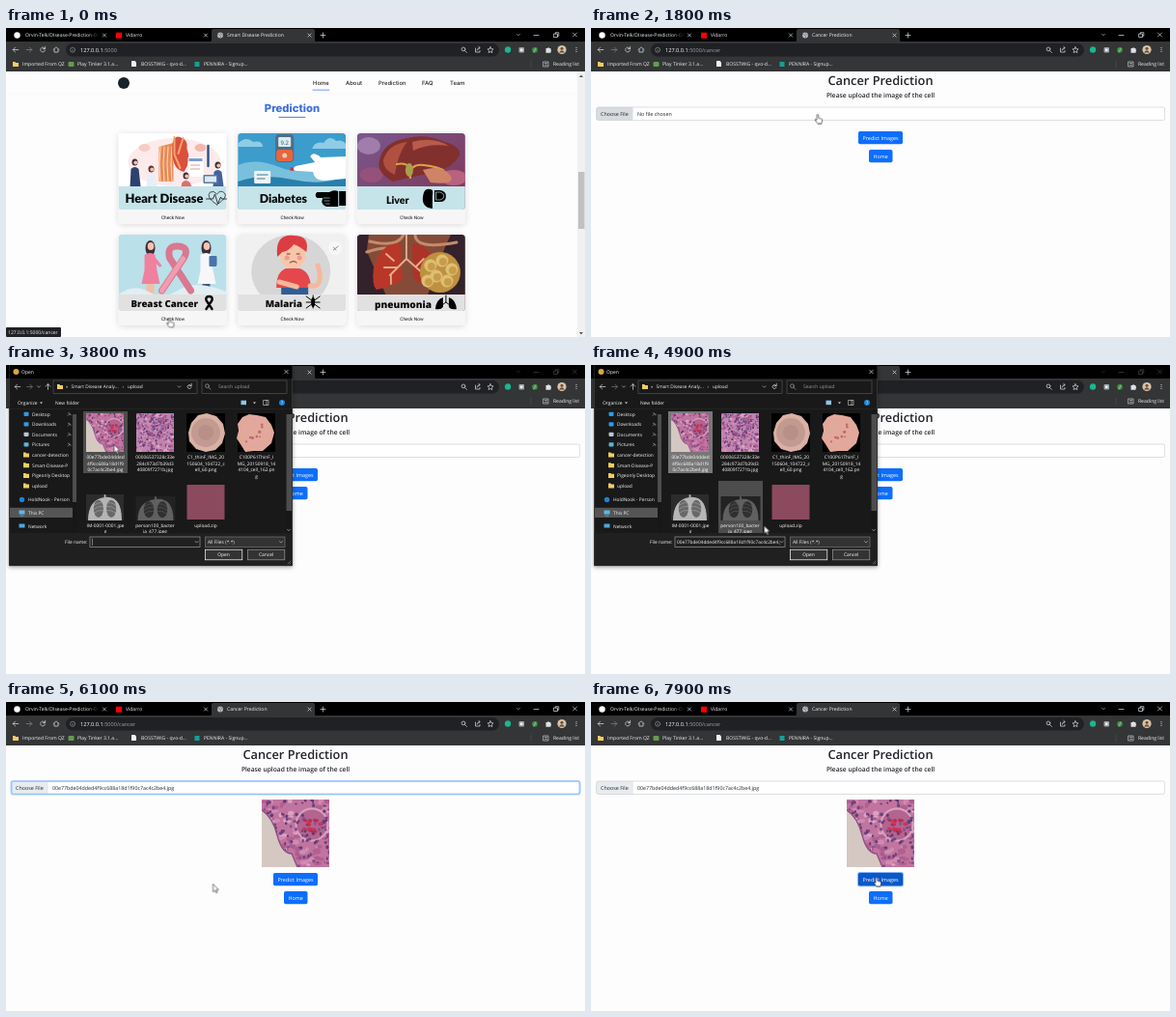
Animation of 600 by 320 pixels, one loop 8 s. Source, as an HTML page:

```html
<!DOCTYPE html>
<html lang="en">
<head>
<meta charset="utf-8">
<title>Cancer Prediction</title>
<style>
html,body{margin:0;width:100%;height:100%;overflow:hidden;background:#fefdfe}
svg{display:block}
#stage{width:600px;height:320px;font-family:"Open Sans",sans-serif;text-rendering:geometricPrecision}
.line{fill:none;stroke-linecap:round;stroke-linejoin:round}
.mid{text-anchor:middle}
.end{text-anchor:end}
.inter{font-family:Inter,sans-serif;font-weight:500}
.roboto{font-family:Roboto,sans-serif}
.lato{font-family:Lato,sans-serif;font-weight:900}
.heavy{font-weight:800}
.semi{font-weight:600}
#dialog{transform-origin:150px 104px;animation:dialog 8s linear infinite}
#pointer{animation:pointer 8s infinite}
@keyframes dialog{
  0%,29.4%{opacity:0;transform:scale(.95)}
  32%,71.25%{opacity:1;transform:none}
  72.5%{opacity:.7;transform:scale(.986)}
  75%,to{opacity:0;transform:scale(.96)}
}
</style>
</head>
<body>
<svg id="stage" viewBox="0 0 600 320"></svg>
<script>
const LOOP = 8000;
let css = '', spans = 0;

const text = (x, y, s, size = 5.05, fill = '#f4f5f6', cls = '') =>
  `<text x="${x}" y="${y}" font-size="${size}" fill="${fill}" class="${cls}">${s}</text>`;
const rect = (x, y, w, h, fill, rx = 0, more = '') =>
  `<rect x="${x}" y="${y}" width="${w}" height="${h}" fill="${fill}" rx="${rx}" ${more}/>`;
const oval = (x, y, rx, fill, ry = rx) =>
  `<ellipse cx="${x}" cy="${y}" rx="${rx}" ry="${ry}" fill="${fill}"/>`;
const shape = (d, fill, more = '') => `<path d="${d}" fill="${fill}" ${more}/>`;
const line = (d, stroke = '#dfe1e5', w = .7) =>
  `<path class="line" d="${d}" stroke="${stroke}" stroke-width="${w}"/>`;
const at = (x, y, body) => `<g transform="translate(${x} ${y})">${body}</g>`;
const cross = (x, y, r = 1.6, c = '#dfe1e5') =>
  line(`M${x - r} ${y - r}l${2 * r} ${2 * r}m0 ${-2 * r}l${-2 * r} ${2 * r}`, c);
const chevron = (x, y, c = '#c8c8c8') => line(`M${x - 1.5} ${y - .8}l1.5 1.6 1.5-1.6`, c, .6);
const leftArrow = (x, y, c) => line(`M${x + 2.8} ${y}h-5.6m2.4-2.4l-2.4 2.4 2.4 2.4`, c);
const rightArrow = (x, y, c) => line(`M${x - 2.8} ${y}h5.6m-2.4-2.4l2.4 2.4-2.4 2.4`, c);
const reload = (x, y, r = 2.4) =>
  line(`M${x + r} ${y - .8}a${r} ${r} 0 1 0 0 1.6m.2-4v2.4h-2.2`);
const lens = (x, y, c) => line(`M${x + 1} ${y + 1}l1.9 1.9M${x + 1.4} ${y - .6}a1.9 1.9 0 1 0-3.8 0a1.9 1.9 0 1 0 3.8 0`, c);
const folder = (x, y) => shape(`M${x - 3} ${y - 2.4}h2.3l.8.8h2.9v4.2h-6z`, '#f3cd62');

// Shows a group only between two times of the loop.
function during(from, to, body) {
  const name = 'span' + ++spans, pct = t => t / LOOP * 100 + '%';
  css += `@keyframes ${name}{0%{opacity:${from ? 0 : 1}}${pct(from)}{opacity:1}${to < LOOP ? pct(to) + ',to{opacity:0}' : 'to{opacity:1}'}}`;
  return `<g style="animation:${name} 8s step-end infinite">${body}</g>`;
}

function random(seed) {
  return () => (seed = (seed * 16807) % 2147483647) / 2147483647;
}

// Stained tissue, 70 by 70.
function tissue(id, seed, biopsy) {
  const rnd = random(seed), pick = list => list[Math.floor(rnd() * list.length)];
  let s = rect(0, 0, 70, 70, biopsy ? '#c0749f' : '#bd85b0');
  for (let i = 0; i < 130; i++)
    s += oval(rnd() * 70, rnd() * 70, 1.5 + rnd() * 3.5, pick(['#cf8bb0', '#b3608f', '#d9a3c2', '#ac5c90']), 1 + rnd() * 2);
  if (biopsy) s += oval(52, 26, 17.5, '#d9a3c0') + oval(52, 26, 15.5, '#b3648f');
  for (let i = 0; i < (biopsy ? 125 : 170); i++)
    s += oval(rnd() * 70, rnd() * 70, 1 + rnd() * 1.1, pick(['#70457f', '#84508e', '#643a72']), 1 + rnd() * 1.2);
  if (biopsy) {
    for (let i = 0; i < 15; i++) s += oval(44 + rnd() * 17, 19 + rnd() * 15, 2.2, pick(['#cf3456', '#b92d55']), 1.6);
    s += shape('M0 11Q11 18 16 37T31 56L37 70H0Z', '#d5c8c2') + line('M0 11Q11 18 16 37T31 56L37 70', '#8b4d85', 1.3);
  }
  return `<symbol id="${id}" viewBox="0 0 70 70" preserveAspectRatio="none">${s}</symbol>`;
}
const picture = (id, x, y, w, h) => `<use href="#${id}" x="${x}" y="${y}" width="${w}" height="${h}"/>`;

function browser() {
  const grey = '#9aa0a6', bar = '#343536';
  return rect(0, 0, 600, 15, '#000') + rect(0, 14, 600, 31, bar) +
    shape('M211 14.5q2 0 2-2V3q0-2 2-2h103q2 0 2 2v9.5q0 2 2 2z', bar) +
    oval(11.5, 7.5, 3.2, '#fff') + text(20, 9.3, 'Orvin-Telk/DIsease-Prediction-On', 5.05, 'url(#fade)') + cross(102, 7.5) +
    rect(114, 4.7, 6, 6, '#f00') + text(124, 9.3, 'Vidarro') + cross(207, 7.5) +
    oval(222, 7.5, 3, '#b6babf') + line('M219.5 6.5l2.5 1 .5 2M222 5l2.3 2.5', '#5f6368', .6) +
    during(0, 300, text(229, 9.3, 'Smart Disease Prediction')) + during(300, LOOP, text(229, 9.3, 'Cancer Prediction')) +
    cross(314.5, 7.5) + line('M326 7.5h5m-2.5-2.5v5') +
    chevron(531, 7) + line('M547 7.5h5M568 6h3.5v3.5h-3.5zM569.3 6V4.7h3.5v3.5h-1.3') + cross(589.5, 7, 2) +
    during(2450, 5900, rect(524, 1, 76, 12, '#000', 0, 'opacity=".7"')) +
    leftArrow(10, 22.5) + rightArrow(24, 22.5, '#85888d') + reload(38, 22.5) + line('M49 22.5l3-2.7 3 2.7M50 22v3h4v-3') +
    rect(62, 16, 449, 13.4, '#202124', 6.7) + line('M71.6 22.7a2.5 2.5 0 1 0-5 0a2.5 2.5 0 1 0 5 0M69.1 22.5v1.4', grey, .6) +
    `<text x="77" y="24.7" font-size="5.6" fill="#fff">127.0.0.1<tspan fill="${grey}">:5000</tspan></text>` +
    during(300, LOOP, `<text x="77" y="24.7" font-size="5.6" fill="none">127.0.0.1:5000<tspan fill="${grey}">/cancer</tspan></text>`) +
    lens(474.5, 22.5) + line('M486.5 21v4h4.5v-1.5M488 23q.5-2.5 3-2.5m-1.2-1.2l1.3 1.2-1.3 1.3') +
    line('M502 19.7l.9 1.9 2.1.3-1.5 1.5.4 2.1-1.9-1-1.9 1 .4-2.1-1.5-1.5 2.1-.3z') +
    oval(520, 22.5, 3.2, '#18b890') + rect(531.5, 20, 5.5, 5.5, '#9fa7ac', 1) + oval(534.2, 22.7, 1.3, '#fff') +
    oval(548, 22.7, 2.8, '#3f9448') + line('M547 25l2-4', '#b7d8a4') +
    shape('M559.5 21h1.5a1.2 1.2 0 0 1 2.2 0h1.3v1.5a1.2 1.2 0 0 1 0 2v1.2h-5z', '#dfe1e5') +
    oval(576, 22.5, 4.6, '#d8c5a5') + oval(576, 21.3, 1.5, '#6a4b3c') + shape('M573 25.5q3-4.5 6 0z', '#6a4b3c') +
    [20.5, 22.5, 24.5].map(y => oval(591, y, .6, '#dfe1e5')).join('') +
    folder(10, 37.5) + text(17, 39.3, 'Imported From QZ') +
    rect(64.5, 35, 6, 5, '#659a55', 1) + text(74, 39.3, 'Play Tinker 3.1.a...') +
    shape('M130 34h3.5l1.5 1.5v4.5h-5z', '#f1f3f4') + text(140, 39.3, 'BOSSTWIG - qvo-d...') +
    rect(195.5, 35, 5, 5, '#14a098') + text(205, 39.3, 'PENNIRA - Signup...') +
    line('M544 34v7', '#5f6368', .4) + line('M557 35h5v5h-5zM558.5 36.5h2M558.5 38.3h2', '#dfe1e5', .6) + text(567, 39.3, 'Reading list');
}

const pinkPerson = (x, dress, legs) => at(x, 0,
  oval(0, 14, 5, '#3e2b3c', 8) + oval(.5, 12, 3.3, '#f6c4ae', 4) + rect(-4, 44, 8, 18, legs) + shape('M-6 21q6-4 11 0l2 16 3 14h-19l3-14z', dress) +
  shape('M4 22l8 10-2 2-8-8z', dress));
const medic = (x, y, coat, hair) => oval(x, y, 3, hair, 3.6) + oval(x + .8, y + .6, 2, '#f3bea3') + shape(`M${x - 5} 55l1-${48 - y}q4-4 8 0l2 ${48 - y}z`, coat);
const strands = (x, top, bottom, color) => [0, 4, 8, 12].map(d => line(`M${x + d} ${top}q-2 ${(bottom - top) / 2} 0 ${bottom - top}`, color, 1)).join('');

const art = [
  rect(0, 0, 112, 79, '#fff', 3) + oval(58, 30, 48, '#fcebea', 25) +
    shape('M42 14l15-4v40H42z', '#e98a55') + strands(43.5, 14, 50, '#fbe0cd') +
    shape('M56 11q2-11 10-6 6 2 5 11 5 12-3 24-14-2-12-29z', '#d9503c') + line('M58 4v18l6 14M67 5l-5 16', '#f3a46c', 2) +
    rect(72, 25, 16, 20, '#fff', 1) + rect(73, 26, 14, 3, '#7c9bd1') + line('M75 33h9M75 37h9', '#e59a92', 1) +
    line('M93 13v21', '#2c4f8f', 2.4) + medic(17, 30, '#2c426f', '#3c2a39') + medic(34, 37, '#e9eef6', '#55333a') + medic(70, 44, '#df6f67', '#3c2a39') + medic(103, 33, '#41659c', '#3c2a39') +
    rect(88, 43, 15, 9, '#5d779f', 1) + rect(89.5, 44.5, 12, 6, '#dbeaf5') + oval(85, 15, 6, '#f4b8b1', 4) + oval(27, 15, 6, '#f8ccc6', 4),
  rect(0, 0, 112, 79, '#3c9ccc', 3) + shape('M0 11q8-9 16-2 9-2 10 5H0zM77 16q3-8 12-6 6-9 13-2 6-2 10 3v5z', '#8fcce6') + shape('M0 33q20-8 43 2t69-2v24H0z', '#79c0dd') + shape('M0 50q25-9 57-2t55-4v13H0z', '#287fad') +
    rect(39, 1, 19, 29, '#536b82', 4) + rect(40, 17, 17, 12, '#e7663d', 3) + rect(42, 4, 13, 10, '#d7edf0', 1) + text(48.5, 11.5, '9.2', 6, '#35516a', 'mid') + oval(48.5, 23, 2.5, '#f7c9ad') +
    shape('M112 24L86 25q-8-7-11-1l5 6-20 4q-5 3 0 5l18 1q1 9 12 9l22-2z', '#fff') + rect(17, 39, 17, 13, '#eef4f5', 1) + line('M20 43h11M20 47h8', '#3775a1', 1) + oval(56, 37, 2, '#d53337'),
  rect(0, 0, 112, 79, 'url(#plum)', 3) + oval(12, 13, 12, '#a07daa', 9) + oval(100, 46, 14, '#b7627e', 8) + oval(15, 43, 12, '#94517a', 8) +
    shape('M23 29q3-20 29-24 19-5 39 4 17 5 15 14-7 13-25 17T37 50q-17-9-14-21z', '#81302d') + shape('M27 28q5-17 25-19-9 10-13 34-12-5-12-15z', '#b0503f') +
    shape('M57 9q21-6 38 4-21-3-37 5z', '#b85a4c') + line('M55 46q-1-15 14-13t20 5M56 36q-6-6-15-4', '#e0a148', 2.2) + oval(54, 38, 4, '#a9a04a', 7) + shape('M68 38q20-6 28 5t-20 8z', '#cf8468'),
  rect(0, 0, 112, 79, '#bae0ea', 3) + pinkPerson(33, '#ef819f', '#f3bea3') + pinkPerson(91, '#f7f6f8', '#3f5582') + rect(94, 22, 8, 11, '#4974a9', 1) +
    shape('M0 62q16-12 31-3t32-2 49 2v3z', '#e2eef2') + line('M45 58L68 24Q74 13 62 12t-9 12L75 58', '#d97891', 7) + line('M45 58L67 25', '#ee9eb0', 5),
  rect(0, 0, 112, 79, '#f0f0f0', 3) + oval(55, 38, 41, '#d6d6d6', 38) + rect(45, 51, 28, 11, '#355c91') + shape('M40 55q0-17 10-20h14q11 3 12 20z', '#e5484c') + oval(57, 22, 13, '#f9c5a8', 13) +
    shape('M41 23q-3-24 17-22 17 0 13 17-7-6-13-8-5 7-12 8z', '#dd3d42') + oval(51, 24, 2.5, '#ef9991') + oval(64, 24, 2.5, '#ef9991') + line('M51 20h3M61 20h3M54 29q4-3 7 0', '#593731', 1) + line('M75 53q11 2 10-12l-2-9M43 49l18 5', '#f5b89a', 5) +
    oval(101, 14, 7, '#f7f7f7') + line('M99 16l5-4M99 13l3 3', '#666', .7),
  rect(0, 0, 112, 79, '#33212c', 3) + shape('M12 0h85l-6 13-18 50H30L10 17z', '#854b39') + line('M13 7Q42 14 48 0M103 8Q60 16 60 0M10 18q12-4 20-4', '#c48b6b', 3) +
    shape('M45 10Q26 6 17 35q-2 17 3 22 20-4 27-11z', '#b93728') + shape('M57 10q18-2 25 25 2 14-2 20-18-4-22-11z', '#ad3328') +
    line('M51 0v25L34 42M51 25l17 15M42 34l-14 0M38 27l-8-7M61 33l8-8M35 41v10', '#e6af8d', 1.8) + oval(86, 39, 21, '#be9140') +
    [[76, 32], [88, 27], [98, 36], [82, 43], [93, 48], [73, 48]].map(([x, y]) => oval(x, y, 6.5, '#dfbf72') + oval(x + 1, y + 1, 4, '#c89d4a')).join('')
];
const glyphs = [
  line('M91 68h7l2-5 3 10 3-7 1 2h5', '#111', .8) + line('M102 74q-12-8-7-13 4-2 7 2 4-5 8-1 4 4-8 12', '#111', .7),
  shape('M82 61h13q4-3 9-1v16H92q-4-1-5-5l1-4h-6q-3-3 0-6z', '#000') + rect(105, 60, 7, 15, '#000') + line('M89 67h6M90 70h5M91 73h4', '#c5e4e9', .6),
  shape('M68 66q1-10 8-8 4 1 2 7v13q-11-1-10-12zM80 59h6q6 1 6 6 0 6-6 6h-6z', '#000') + line('M79 59v18', '#c5e4e9', .9) + line('M82 61h4q4 1 4 4t-4 4h-4z', '#c5e4e9', .7),
  line('M91 77l6-9q1-4-3-4t-3 4l6 9', '#000', 2.4),
  oval(78, 70, 2, '#000', 5) + line('M71 64l7 5 7-5M71 70h14M71 76l7-5 7 5M78 63v13', '#000', 1),
  shape('M89 65q-7 2-8 12 6 1 8-2zM95 65q7 2 8 12-6 1-8-2z', '#000') + line('M92 63v7l-4 3M92 70l4 3', '#000', 1)
];
const labels = [['Heart Disease', 7, 72, 12.8, 'lato'], ['Diabetes', 22.5, 72, 12.3, 'lato'], ['Liver', 30, 73, 10.6, 'lato'],
  ['Breast Cancer', 13, 75, 9.7, 'heavy'], ['Malaria', 28.5, 74.7, 9.7, 'heavy'], ['pneumonia', 18, 75.5, 10.1, 'heavy']];

function card(i) {
  const [name, x, y, size, cls] = labels[i], low = i > 2;
  return at(116.5 + i % 3 * 123.7, low ? 214 : 109,
    rect(0, 0, 112, 94, '#f6f6f6', 4, 'filter="url(#halo)"') + `<g clip-path="url(#face)">${art[i]}` +
    rect(0, low ? 62 : 55, 112, low ? 17 : 24, low ? '#e1e1e1' : '#c5e4e9') + '</g>' +
    text(x, y, name, size, '#080808', cls) + glyphs[i] + text(56.5, 88.7, 'Check Now', 4.8, '#111', 'mid roboto'));
}

function homePage() {
  const nav = [['Home', 318], ['About', 352], ['Prediction', 386], ['FAQ', 431], ['Team', 460]];
  return rect(0, 45, 600, 275, '#fefdfe') + line('M0 68h592', '#f3f3f5', .6) + oval(122, 57, 6, '#17222b') +
    nav.map(([s, x]) => text(x, 58.5, s, 5.9, '#222', 'inter')).join('') + line('M318 64.2h17', '#4a80e8', .8) +
    text(296.5, 87, 'Prediction', 11.3, '#3d6fd9', 'mid inter heavy') + line('M283 92.4h27', '#3d6fd9', .9) +
    [0, 1, 2, 3, 4, 5].map(card).join('') +
    rect(592, 45, 8, 275, '#f1f1f1') + rect(593, 149, 6.5, 59, '#c1c1c1') +
    shape('M594 51l2-2.5 2 2.5zM594 315l2 2.5 2-2.5z', '#555') +
    rect(0, 310, 57, 10, '#202124', 1) + text(2, 317, '127.0.0.1:5000/cancer', 5.05, '#f1f3f4');
}

const button = (x, y, w, label, fill = '#0d6efd') =>
  rect(x, y, w, 13.2, fill, 1.8) + text(x + w / 2, y + 8.6, label, 5.4, '#fff', 'mid');
const predict = (y, fill) => button(277, y, 46, 'Predict Images', fill);
const buttons = y => predict(y) + button(288, y + 19, 24.5, 'Home');

function cancerPage() {
  const border = (c, w) => rect(5.6, 82, 589, 13.5, 'none', 2, `stroke="${c}" stroke-width="${w}"`);
  const choose = text(10, 90.8, 'Choose File', 5.4, '#212529');
  return text(300, 59, 'Cancer Prediction', 12.8, '#212529', 'mid semi') +
    text(300, 72, 'Please upload the image of the cell', 6.7, '#212529', 'mid semi') +
    rect(5.6, 82, 589, 13.5, '#fff', 2) + rect(5.6, 82, 37.5, 13.5, '#e9ecef', 2) +
    during(1650, 2450, rect(5.6, 82, 37.5, 13.5, '#d8dcdf', 2)) + choose + line('M43.2 82v13.5', '#ced4da', .5) + border('#c3cad1', .6) +
    during(300, 6100, text(48, 90.8, 'No file chosen', 5.4, '#212529') + buttons(107)) +
    during(6100, LOOP, text(48, 90.8, '00e77bde04dded4f9cc688a18d1f90c7ac4c2be4.jpg', 5.3, '#212529') + picture('biopsy', 265, 101, 70, 70) + buttons(177)) +
    during(6100, 7800, border('#b6d4fe', 2.2) + border('#86b7fe', .6)) +
    during(7400, 7800, predict(177, '#0b5ed7')) +
    during(7800, LOOP, rect(276, 176, 48, 15.2, '#86b4f8', 2.5) + predict(177, '#0a58ca'));
}

function fileLabel(x, y, lines) {
  return lines.map((s, i) => text(x, y + i * 6.5, s, 4.8, '#fff', 'mid')).join('');
}

function chest(x, y, w, h, back, bone, lung) {
  return at(x, y, rect(0, 0, w, h, back) + shape(`M2 ${h}Q2 5 ${w / 2} 3T${w - 2} ${h}z`, bone) +
    oval(w * .33, h * .55, w * .13, lung, h * .34) + oval(w * .67, h * .55, w * .13, lung, h * .34) +
    line(`M${w / 2} 1v${h - 2}`, bone, 1.8) +
    [.35, .5, .65].map(k => line(`M${w * .2} ${h * k + 2}q${w * .13}-4 ${w * .25}-3m${w * .1} 0q${w * .12}-1 ${w * .25} 3`, bone, .5)).join(''));
}

function dialog() {
  const box = (x, y, w, h, fill, stroke) => rect(x, y, w, h, fill, 0, `stroke="${stroke}" stroke-width=".7"`);
  const tree = [['Desktop', 51, '#2e9be8'], ['Downloads', 61.5, '#2e9be8'], ['Documents', 72, '#b9c7d3'], ['Pictures', 82.5, '#58b6dc'],
    ['cancer-detection', 93], ['Smart-Disease-P', 103.7], ['Pigeonly Desktop', 114.3], ['upload', 125]];
  const pin = y => line(`M64 ${y + 1.5}l1.2-1.2m-.6-1.4l2 2m-1.4-2.4l2 2`, '#aaa', .6);
  const hover = (x, y, h, c = '#4d4d4d') => rect(x, y, 46, h, c);
  const path = (folderName, x) => text(67.5, 24.2, folderName, 4.8) + text(x, 24, '›', 4.8) + text(x + 5.5, 24.2, 'upload', 4.8);
  const spots = random(7);
  let dots = '';
  for (let i = 0; i < 8; i++) dots += oval(249 + spots() * 20, 59 + spots() * 22, .9 + spots() * .8, '#c0686c');
  const openButton = fill => box(206.4, 191.2, 38.4, 10.6, fill, '#fff') + text(225.6, 198.3, 'Open', 4.9, '#fff', 'mid');
  return rect(3, 0, 294, 208, '#191919', 0, 'filter="url(#soft)"') + box(3.3, .3, 293.4, 207.5, '#191919', '#444') +
    rect(3.5, 0, 293, 14, '#000') + oval(10.5, 7, 3, '#d9a53c') + text(16, 9, 'Open') + cross(290.5, 7, 1.8) +
    leftArrow(12, 22.5, '#ddd') + rightArrow(24.5, 22.5, '#777') + chevron(34, 22.5) + line('M43.5 25.3v-5.6m-2.3 2.4l2.3-2.4 2.3 2.4') +
    box(49, 16, 149, 13.5, '#191919', '#535353') + folder(56, 22.5) + text(62, 24.2, '«', 4.8) +
    during(0, 3300, path('Smart Disease Analysis', 121.5)) + during(3300, LOOP, path('Smart Disease Analy...', 120.5)) +
    chevron(179.5, 22.5) + reload(190, 22.5, 2) + box(203, 16, 88, 13.5, '#191919', '#535353') + lens(209, 22.3, '#aaa') + text(220, 24.2, 'Search upload', 4.9, '#9a9a9a') +
    text(12, 40.7, 'Organize', 4.9) + shape('M35 38.5h3l-1.5 1.7z', '#ddd') + text(51, 40.7, 'New folder', 4.9) +
    rect(243.5, 36.7, 5.5, 4.5, '#8dc5e8') + shape('M256 38.5h3l-1.5 1.7z', '#ddd') + line('M267 36.5h5v5h-5zM270 36.5v5', '#ddd', .6) +
    oval(286, 39, 3, '#1684d8') + text(286, 40.8, '?', 5, '#fff', 'mid') + line('M4 45.5h292', '#2c2c2c', .5) +
    tree.map(([s, y, c]) => (c ? rect(18.5, y - 2.3, 5, 4.2, c, .8) + pin(y) : folder(21, y)) + text(27, y + 1.8, s, 4.85)).join('') +
    oval(16.5, 139.5, 2.7, '#1685d8') + text(23, 141.3, 'HoldNook - Person', 4.85) +
    rect(4, 147.8, 66, 10.2, '#555') + rect(13.5, 150.5, 6, 4, '#5bb9e9') + line('M15 156h3', '#5bb9e9') + text(23, 154.8, 'This PC', 4.85) +
    rect(13.5, 164.5, 6, 4, '#4ca7de') + text(23, 168.8, 'Network', 4.85) +
    rect(69, 46, 4, 128, '#171717') + rect(69, 51, 4, 91, '#4d4d4d') + rect(290, 46, 6, 128, '#171717') + rect(290.5, 51, 5.5, 100, '#4d4d4d') + chevron(293, 171) +
    during(2550, 3400, hover(184, 48, 69)) + during(3400, 3750, hover(131.5, 48, 64)) + during(3750, 4200, hover(80, 48, 64)) +
    during(4200, LOOP, hover(80, 48, 64, '#777')) + during(4650, 5150, hover(132, 120, 54)) +
    picture('biopsy', 83, 50, 39, 40) + picture('dense', 135, 50, 39, 40) +
    rect(187, 50, 40, 40, '#000') + rect(240, 50, 39, 40, '#000') +
    shape('M199 52l9-2 10 3 7 8 2 10-3 10-7 7-10 2-10-3-7-8-1-9 3-10z', '#d9b1a5') + oval(207, 70, 15, '#c39a90') + oval(207, 70, 8, '#b98f88') +
    shape('M245 54l7-3 8 1 9 2 6 8 3 8-3 11-9 8-9 0-9 1-5-8-4-6 2-8-1-7z', '#e3a89c') + dots +
    fileLabel(103, 97, ['00e77bde04dded', '4f9cc688a18d1f9', '0c7ac4c2be4.jpg']) + fileLabel(154.5, 97, ['00006537328c33e', '284c973d7b39d3', '40809f7271b.jpg']) +
    fileLabel(207, 97, ['C1_thinF_IMG_20', '150604_104722_c', 'ell_60.png']) + fileLabel(259.5, 97, ['C100P61ThinF_I', 'MG_20150918_14', '4104_cell_162.pn', 'g']) +
    chest(83, 134, 39, 27, '#2c2c2c', '#b5b5b5', '#686868') + chest(134.5, 136, 41, 25, '#222', '#606060', '#303030') + rect(187.5, 124, 39, 36, '#8c4a5e') +
    fileLabel(103, 167.7, ['IM-0001-0001.jpe', 'g']) + fileLabel(154.5, 167.7, ['person100_bacter', 'ia_477.jpeg']) + fileLabel(207, 167.7, ['upload.zip']) +
    rect(3.7, 174, 292.6, 33.4, '#202020') + text(61, 184.7, 'File name:', 4.9) + box(87, 178, 114, 10.4, '#202020', '#999') +
    during(2600, 3130, line('M89.3 180v6.5', '#fff', .5)) + during(3660, 4190, line('M89.3 180v6.5', '#fff', .5)) +
    during(4200, 5550, `<svg x="88" y="178" width="107.5" height="10">${text(1, 6.7, '00e77bde04dded4f9cc688a18d1f90c7ac4c2be4.jpg', 4.75)}</svg>`) +
    during(5550, LOOP, rect(88, 179.5, 106, 7.4, '#0878d2') + `<svg x="88" y="178" width="107" height="10">${text(105, 6.7, '00e77bde04dded4f9cc688a18d1f90c7ac4c2be4.jpg', 4.75, '#fff', 'end')}</svg>`) +
    chevron(197.5, 183.3) + box(206.4, 178, 82.6, 10.4, '#333', '#777') + text(209, 184.7, 'All Files (*.*)', 4.9) + chevron(285, 183.3) +
    openButton('#333') + during(5300, LOOP, openButton('#777')) + box(250.4, 191.2, 38.4, 10.6, '#333', '#999') + text(269.6, 198.3, 'Cancel', 4.9, '#fff', 'mid') +
    line('M292 206l3-3M294 206l1-1', '#888', .6);
}

function pointer() {
  const stops = [[0, 169.5, 300.5], [900, 169.5, 300.5], [1300, 226, 124], [1500, 226, 124], [1800, 235, 89.5], [2400, 235, 89.5], [2900, 222, 92], [3300, 222, 92],
    [4000, 106, 82], [4300, 106, 82], [4900, 179.5, 166.5], [5100, 179.5, 166.5], [5500, 214.5, 188.5], [6100, 214.5, 188.5], [6700, 252, 151], [7100, 252, 151], [7550, 296, 181.5], [LOOP, 296, 181.5]];
  css += `@keyframes pointer{${stops.map(([t, x, y]) => `${t / LOOP * 100}%{transform:translate(${x}px,${y}px)}`).join('')}}`;
  const ink = 'stroke="#222" stroke-width=".6" stroke-linejoin="round"';
  const arrow = shape('M0 0V8.2L1.9 6.5 3.2 9.3 4.5 8.7 3.2 6H5.8Z', '#fff', ink);
  const hand = shape('M-1 .8a.9.9 0 0 1 1.8 0V3.8l3 .7q1 .3.9 1.5L4 9.3H-.2L-2.8 6q-.4-1.2.6-1L-1 6Z', '#fff', ink);
  return `<g id="pointer">${during(0, 300, hand)}${during(300, 1650, arrow)}${during(1650, 2400, hand)}${during(2400, 7400, arrow)}${during(7400, LOOP, hand)}</g>`;
}

const shadow = (id, dy, blur, opacity) => `<filter id="${id}" x="-15%" y="-15%" width="130%" height="130%"><feDropShadow dx="0" dy="${dy}" stdDeviation="${blur}" flood-opacity="${opacity}"/></filter>`;
const defs = `<defs>${tissue('biopsy', 41, true)}${tissue('dense', 977, false)}
<linearGradient id="fade" gradientUnits="userSpaceOnUse" x1="84" x2="97"><stop stop-color="#f4f5f6"/><stop offset="1" stop-color="#f4f5f6" stop-opacity="0"/></linearGradient>
<linearGradient id="plum" x2="1" y2="1"><stop stop-color="#79588f"/><stop offset="1" stop-color="#7f3452"/></linearGradient>
<clipPath id="face"><rect width="112" height="79" rx="3"/></clipPath>
${shadow('soft', 1.5, 2, .35)}${shadow('halo', 1, 3, .14)}</defs>`;

document.getElementById('stage').innerHTML = defs + rect(0, 0, 600, 320, '#fefdfe') + cancerPage() +
  during(0, 300, homePage()) + browser() + `<g id="dialog">${dialog()}</g>` + pointer();
document.head.appendChild(document.createElement('style')).textContent = css;
</script>
</body>
</html>
```
